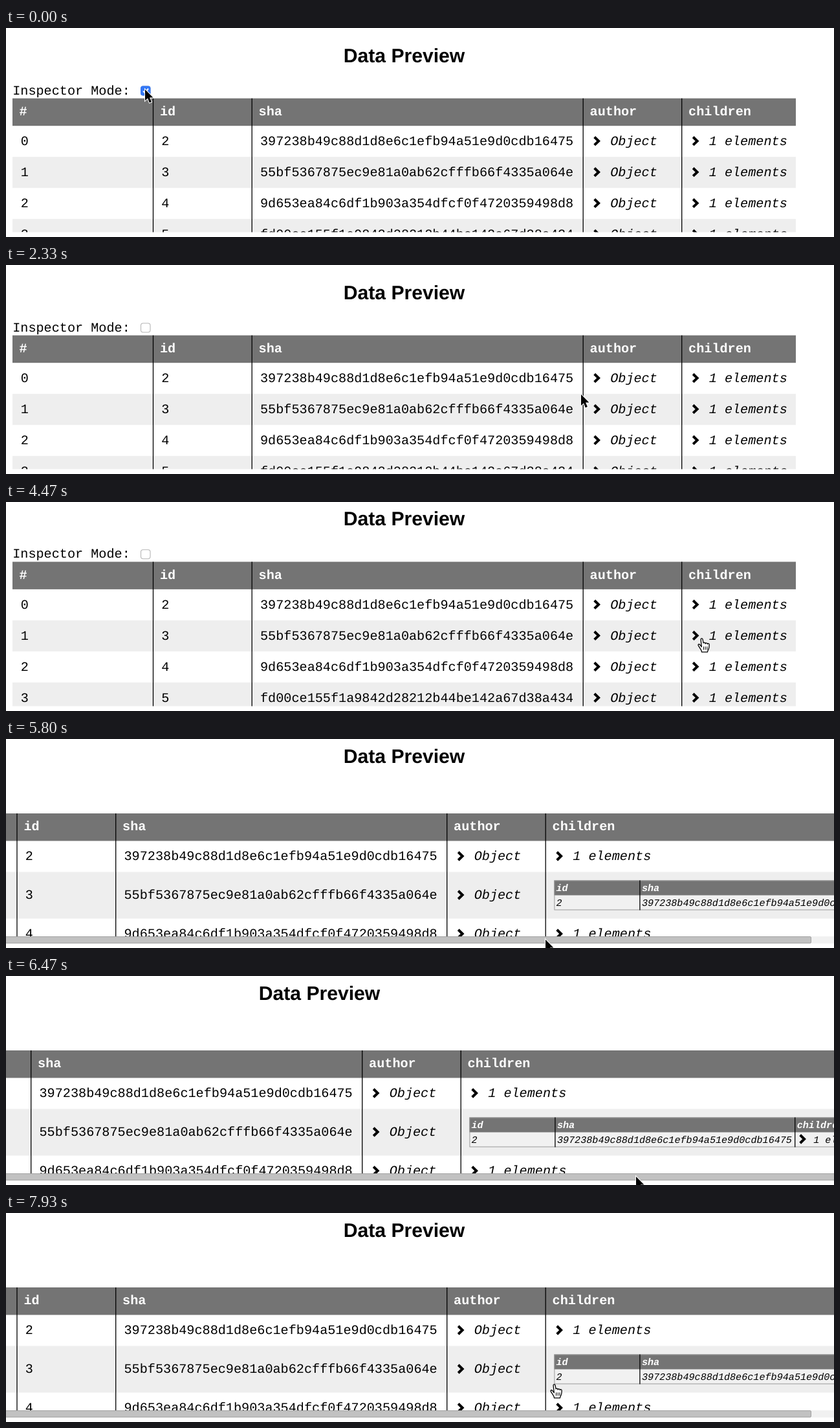
Recreate the animation shown at these times as an HTML page. Size 1280 by 323 pixels, loop 8 s.

```html
<!DOCTYPE html>
<html lang="en">
<head>
<meta charset="utf-8">
<title>Data Preview</title>
<style>
  html, body { margin: 0; width: 100%; height: 100%; overflow: hidden; background: #fff; }
  svg { display: block; width: 1280px; height: 323px; }
  text { font: 20.18px "Courier New", "Liberation Mono", monospace; white-space: pre; text-rendering: geometricPrecision; }
  .title { font: bold 30.15px Helvetica, "Liberation Sans", sans-serif; text-anchor: middle; }
  .head { font-weight: bold; fill: #fff; }
  .it { font-style: italic; }
  .small { font-size: 15.14px; font-style: italic; }
</style>
</head>
<body>
<svg id="stage" viewBox="0 0 1280 323">
  <clipPath id="view"><rect width="1280" height="315.6"/></clipPath>
</svg>
<script>
const stage = document.getElementById('stage');
const GREY = '#747474';
const SHAS = [
  '397238b49c88d1d8e6c1efb94a51e9d0cdb16475',
  '55bf5367875ec9e81a0ab62cfffb66f4335a064e',
  '9d653ea84c6df1b903a354dfcf0f4720359498d8',
  'fd00ce155f1a9842d28212b44be142a67d38a434'
];

function el(parent, tag, attrs, content) {
  const node = document.createElementNS('http://www.w3.org/2000/svg', tag);
  for (const name in attrs) node.setAttribute(name, attrs[name]);
  if (content) node.textContent = content;
  return parent.appendChild(node);
}
const rect = (p, x, y, width, height, fill, more) =>
  el(p, 'rect', { x, y, width, height, fill, ...more });
const text = (p, x, y, content, cls = '') => el(p, 'text', { x, y, class: cls }, content);
const line = (p, x, y, h) => rect(p, x - 0.65, y, 1.3, h, '#000');
const chevron = (p, x, y) =>
  el(p, 'path', { d: `M${x} ${y - 6.2}l6.4 6.2-6.4 6.2`, fill: 'none', stroke: '#000', 'stroke-width': 4 });

function collapsed(p, x, y, label) {
  chevron(p, x + 17.5, y);
  text(p, x + 42, y + 6.3, label, 'it');
}

// Small table shown inside an opened cell; cols are [offset, heading, value]
function nested(p, x, y, width, cols) {
  rect(p, x, y, width, 46, '#f1f1f1');
  rect(p, x, y, width, 23, GREY);
  rect(p, x + 0.5, y + 0.5, width - 1, 45, 'none', { stroke: '#999' });
  for (const [dx, heading, value] of cols) {
    if (dx) line(p, x + dx, y, 46);
    text(p, x + dx + 3, y + 16.2, heading, 'small head');
    if (value[0] === '>') {
      chevron(p, x + dx + 8, y + 33.5);
      text(p, x + dx + 28.5, y + 39, value.slice(1), 'small');
    } else {
      text(p, x + dx + 3, y + 39, value, 'small');
    }
  }
}

function scene({ left, top, titleY, open, extra = 0, label = true }) {
  const clip = el(stage, 'g', { 'clip-path': 'url(#view)' });
  const g = el(clip, 'g', {});
  const x = [10, 227.5, 380.2, 892.2, 1044.7, 1221].map((v, i) => v + left + (i > open ? extra : 0));
  text(g, 615.5, titleY, 'Data Preview', 'title');
  if (label) text(g, x[0] + 0.2, top - 6, 'Inspector Mode:');

  rect(g, x[0], top, x[5] - x[0], 42.5, GREY);
  ['#', 'id', 'sha', 'author', 'children'].forEach((name, i) =>
    text(g, x[i] + 10.4, top + 26.3, name, 'head'));

  let y = top + 42.5;
  SHAS.forEach((sha, r) => {
    const isOpen = open && r === 1;
    const h = isOpen ? 72 : 48;
    const mid = y + h / 2 - 0.5;
    if (r % 2) rect(g, x[0], y, x[5] - x[0], h, '#eee');
    [String(r), String(r + 2), sha].forEach((value, i) => text(g, x[i] + 12.8, mid + 6.3, value));
    if (isOpen && open === 3)
      nested(g, x[3] + 13.4, y + 13, 265.5, [[0, 'id', '2'], [132.3, 'login', 'tbrelmond']]);
    else
      collapsed(g, x[3], mid, 'Object');
    if (isOpen && open === 4)
      nested(g, x[4] + 13.2, y + 13, 573,
        [[0, 'id', '2'], [132.5, 'sha', SHAS[0]], [503.3, 'children', '>1 elements']]);
    else
      collapsed(g, x[4], mid, '1 elements');
    y += h;
  });
  for (let i = 1; i < 5; i++) line(g, x[i], top, y - top);

  const box = { g, clip, authorX: x[3], rowsY: top + 26 };
  if (label) {
    const bx = x[0] + 198.5, by = top - 18.7;
    rect(g, bx, by, 14.5, 14, '#fff', { rx: 3.5, stroke: '#b5b5b5', 'stroke-width': 1.1 });
    box.check = el(g, 'g', { visibility: 'hidden' });
    rect(box.check, bx - 0.5, by - 0.5, 15.5, 15, '#3478f6', { rx: 3.8 });
    el(box.check, 'path', {
      d: `M${bx + 3.6} ${by + 7.4}l2.8 3.2 5-7`, fill: 'none', stroke: '#fff', 'stroke-width': 2
    });
  }
  return box;
}

const base = scene({ left: 0, top: 108.7, titleY: 52.8 });
const author = scene({ left: -69.5, top: 92.4, titleY: 36.6, open: 3, extra: 140 });
const children = scene({ left: -210.5, top: 115, titleY: 36.6, open: 4, extra: 422, label: false });

const bar = el(stage, 'g', {});
rect(bar, 0, 305, 1280, 11, '#f1f1f1');
const thumb = rect(bar, -400, 305.5, 1644.5, 10, '#c1c1c1', { rx: 1.5, stroke: '#a3a3a3' });

const arrow = el(stage, 'path', {
  d: 'M1 1V18.2L5 14.5 7.8 21.4 10.9 20.1 8 13.5H13.4Z',
  stroke: '#fff', 'stroke-width': 2, 'paint-order': 'stroke'
});
const hand = el(stage, 'g', {});
el(hand, 'path', {
  d: 'M.3 12.8L-2.2 9.6C-3.6 8-5.7 9-4.7 10.8L-.8 17.2Q.3 18.8.5 20.9H9.4Q9.7 18.8 11 16.7Q12.1 14.5 12.1 10.8V9.2' +
     'C12.1 7.1 9.5 7.1 9.3 8.6C9.3 6.5 6.3 6.3 6.1 8.1C6.1 5.7 3.3 5.7 3.1 7L2 1.2C1.6-.7-1.2-.4-.9 1.8Z',
  fill: '#fff', stroke: '#000', 'stroke-width': 1.3, 'stroke-linejoin': 'round'
});
el(hand, 'path', { d: 'M3.5 12.4v5M6.2 12.4v5M8.9 12.4v5', stroke: '#000', fill: 'none' });

// Pointer hot spot: time, x, y
const PATH = [
  [0, 214, 94], [330, 624, 206], [400, 624, 206], [800, 1128, 294], [1270, 238, 101],
  [1330, 226, 98], [1600, 214, 94], [1730, 214, 94], [2330, 888, 199], [2600, 929, 218],
  [2730, 945, 218], [2930, 945, 218], [3530, 841, 243], [3730, 841, 243], [4470, 1075, 211],
  [4530, 1075, 211], [5400, 836, 309], [5600, 833, 309], [5800, 833, 309], [6470, 973, 309],
  [6600, 973, 309], [7470, 896, 309], [7730, 833, 309], [7930, 847, 265], [8000, 847, 265]
];

function pointer(t) {
  const i = PATH.findIndex(p => p[0] > t);
  const [t0, x0, y0] = PATH[i - 1], [t1, x1, y1] = PATH[i];
  const u = (t - t0) / (t1 - t0);
  return [x0 + (x1 - x0) * u, y0 + (y1 - y0) * u];
}

const show = (node, on) => node.setAttribute('visibility', on ? 'visible' : 'hidden');
const move = (node, x, y) => node.setAttribute('transform', `translate(${x} ${y})`);

function draw(ms) {
  // The picture advances 15 times a second
  const t = Math.round(Math.floor((ms % 8000 + 3.4) * 0.015) % 120 * 20 / 3) * 10;
  const current = t >= 4530 ? children : t >= 2930 && t < 3730 ? author : base;
  for (const s of [base, author, children])
    s.clip.style.display = s === current ? '' : 'none';
  show(base.check, t < 1600);
  move(base.g, 0, -16.3 * Math.min(1, Math.max(0, (t - 2330) / 200)));

  const [x, y] = pointer(t);
  const drag = t > 5800 && t < 7730 ? x - 833 : 0;
  move(children.g, -drag * 131 / 140, 0);
  move(thumb, drag, 0);
  show(bar, current === children);

  const overCell = x > current.authorX && y > current.rowsY && y < 305;
  show(hand, overCell);
  show(arrow, !overCell);
  move(overCell ? hand : arrow, x, y);
}

const start = performance.now();
function tick() {
  draw(performance.now() - start);
  requestAnimationFrame(tick);
}
tick();
</script>
</body>
</html>
```
